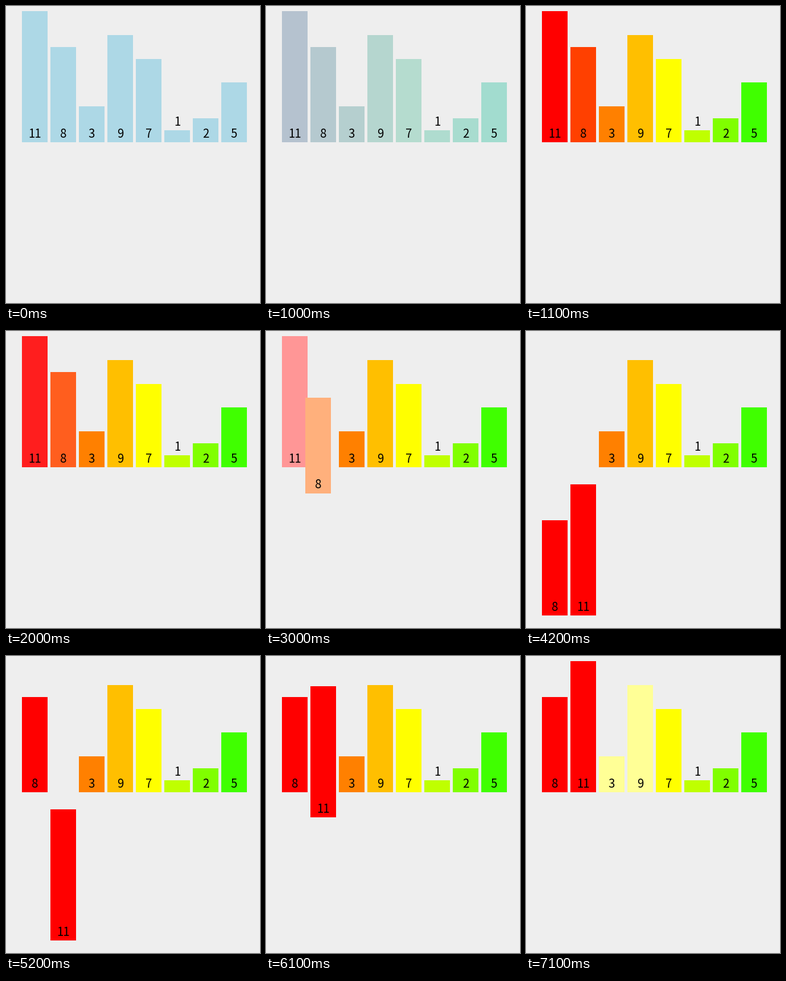
A matplotlib script for the animation above (8 s loop, 446x521 px).

```python
import matplotlib.pyplot as plt
from matplotlib.animation import FuncAnimation
from matplotlib.patches import Rectangle
import numpy as np

W, H, DPI = 446, 521, 100
INTERVAL, LOOP = 100, 8000
VALUES = [11, 8, 3, 9, 7, 1, 2, 5]
LEFT, PITCH, BAR_W, MAX_H = 28, 50, 45, 230
TOP_ROW, LOW_ROW = 239, 499
LABEL_GAP, LABEL_PX = 8, 20.5

BLUE = (173, 216, 230)
RED = (255, 0, 0)
PALE_RED, PALE_ORANGE, PALE_YELLOW = (255, 150, 150), (255, 213, 150), (255, 255, 150)
RAINBOW = [(255, min(255, 63.75 * i), 0) if i < 5 else (255 - 63.75 * (i - 4), 255, 0)
           for i in range(len(VALUES))]


def slot(i):
    return LEFT + PITCH * i


# Each step: start ms, head start ms, duration ms, {bar: {property: end value}}
STEPS = [
    (1000, 10, 100, {i: {"color": c} for i, c in enumerate(RAINBOW)}),
    (2000, 20, 100, {0: {"color": PALE_RED}, 1: {"color": PALE_ORANGE}}),
    (3000, 35, 200, {1: {"pos": (slot(0), LOW_ROW), "color": RED}}),
    (4000, 45, 200, {0: {"pos": (slot(1), LOW_ROW), "color": RED}}),
    (5000, 56, 200, {1: {"pos": (slot(0), TOP_ROW)}}),
    (6000, 66, 200, {0: {"pos": (slot(1), TOP_ROW)}}),
    (7000, 77, 100, {2: {"color": PALE_YELLOW}, 3: {"color": PALE_YELLOW}}),
]


def state_at(ms):
    bars = [{"pos": np.array([slot(i), TOP_ROW], float), "color": np.array(BLUE, float)}
            for i in range(len(VALUES))]
    for start, lead, span, changes in STEPS:
        if ms < start:
            break
        p = min(1, (ms - start + lead) / span)
        for i, props in changes.items():
            for key, end in props.items():
                bars[i][key] += (np.array(end) - bars[i][key]) * p
    return bars


fig = plt.figure(figsize=(W / DPI, H / DPI), dpi=DPI, facecolor="#eeeeee")
ax = fig.add_axes([0, 0, 1, 1])
ax.set_xlim(0, W)
ax.set_ylim(H, 0)
ax.axis("off")

rects, labels = [], []
for i, value in enumerate(VALUES):
    rect = Rectangle((0, 0), BAR_W, MAX_H * value / max(VALUES), linewidth=0, zorder=2 * i)
    rects.append(ax.add_patch(rect))
    labels.append(ax.text(0, 0, str(value), ha="center", va="baseline", color="black",
                          family="Noto Sans CJK JP", fontsize=LABEL_PX * 72 / DPI,
                          zorder=2 * i + 1))


def draw(frame):
    for bar, rect, label in zip(state_at(frame * INTERVAL), rects, labels):
        x, base = bar["pos"]
        height = rect.get_height()
        rect.set_xy((x, base - height))
        rect.set_facecolor(bar["color"] / 255)
        # Labels that do not fit inside sit above their bar
        lift = height if height < 30 else 0
        label.set_position((x + BAR_W / 2, base - lift - LABEL_GAP))
    return rects + labels


anim = FuncAnimation(fig, draw, frames=LOOP // INTERVAL, interval=INTERVAL,
                     repeat=True, repeat_delay=0, blit=False)
plt.show()
```
